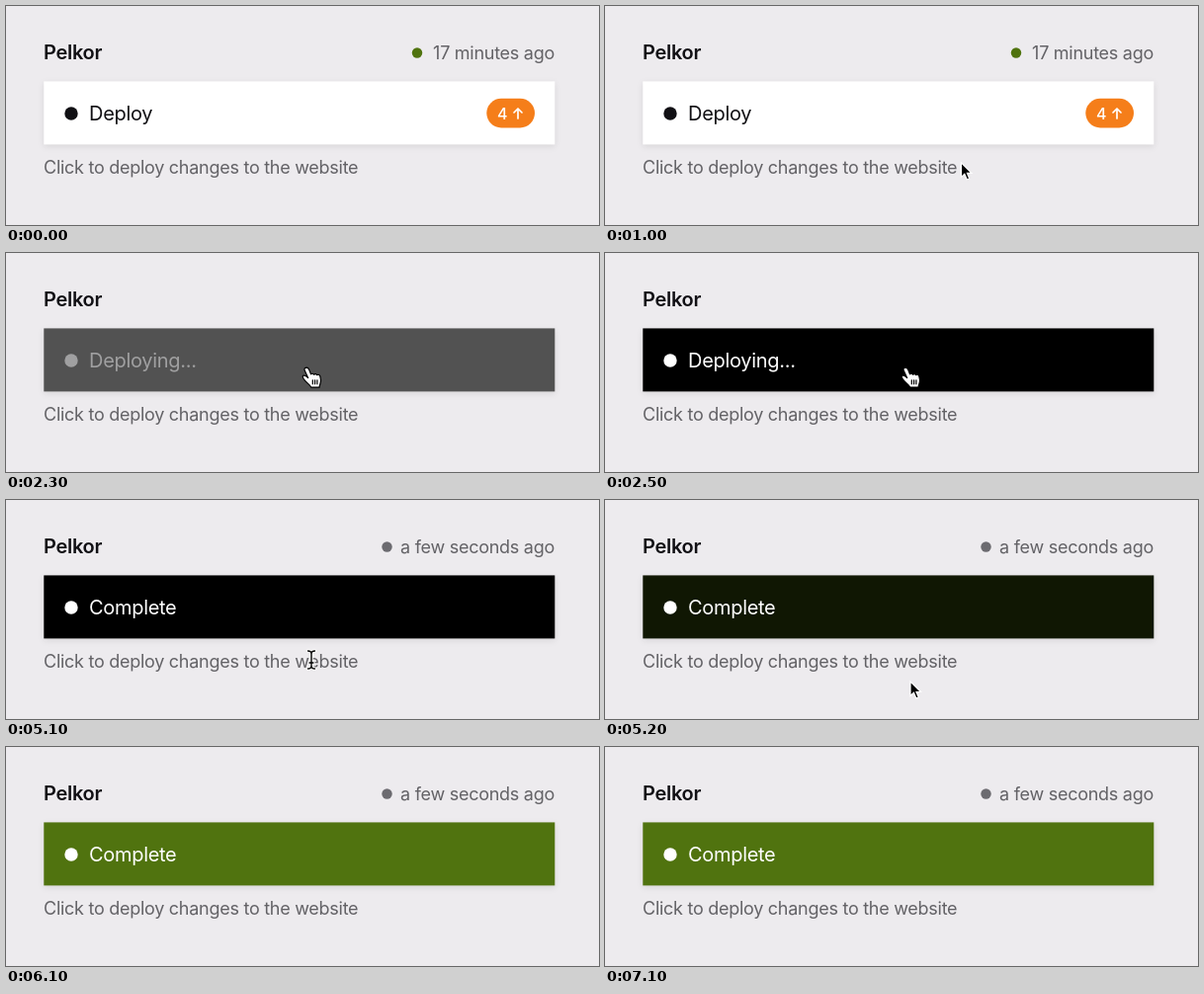
An HTML page that plays this animation: 600x222 px, repeating every 7.2 s.

```html
<!DOCTYPE html>
<html lang="en">
<head>
<meta charset="utf-8">
<title>Deploy button</title>
<style>
  html, body { margin: 0; width: 100%; height: 100%; overflow: hidden; background: #edebee; }
  svg { display: block; width: 600px; height: 222px; }
  text { font: 18px Inter, "Open Sans", sans-serif; letter-spacing: -.015em; fill: #636266; }
  .title { font-size: 20px; font-weight: 600; fill: #111014; }
  .label { font-size: 20px; fill: inherit; }
  .end { text-anchor: end; }
  #button { filter: drop-shadow(0 2px 3px rgba(0, 0, 0, .09)); }
  #badge text { font-size: 16px; font-weight: 500; fill: #fff; }
  .line { fill: none; stroke-linecap: round; stroke-linejoin: round; }
</style>
</head>
<body>
<svg viewBox="0 0 600 222">
  <defs>
    <path id="stem" d="M-3.5 -9Q0 -9 0 -6V6Q0 9 -3.5 9M3.5 -9Q0 -9 0 -6M0 6Q0 9 3.5 9M-2 3H2"/>
  </defs>

  <text class="title" x="38" y="54">Pelkor</text>
  <g id="status">
    <circle id="dot" cy="47.5" r="5.2"/>
    <text id="ago" class="end" x="555" y="53.5"></text>
  </g>
  <rect id="button" x="38.3" y="76.4" width="517" height="64"/>
  <g id="content">
    <circle cx="66" cy="109" r="6.7"/>
    <text id="label" class="label" x="84" y="116"></text>
  </g>
  <g id="badge">
    <rect x="486.3" y="93.8" width="48.7" height="29.6" rx="14.8" fill="#f57e1a"/>
    <text x="497" y="114.5">4</text>
    <path class="line" d="M518 114V104M514 108L518 104L522 108" stroke="#fff" stroke-width="1.7"/>
  </g>
  <text x="38" y="170">Click to deploy changes to the website</text>

  <g id="hand" stroke="#000" stroke-width="1.2" stroke-linejoin="round">
    <path fill="#fff" d="M3.6 .9C5 .2 6.4 1 7 2.4L9 7.4C10 6.4 11.4 6.6 12 7.8C13 6.8 14.6 7 15.1 8.2C16.5 7.4 18 8 18.4 9.8L19 13C19.3 16 17.8 17.4 17.6 20.6H9.2C8.2 18 4.6 16 2.6 13.4C1 11.4 .2 9.6 1.2 8.8C2.8 7.9 4.8 9.8 6.2 11.2L2.7 3.6C2.1 2.3 2.6 1.3 3.6 .9Z"/>
    <path class="line" d="M10.8 13.3V17.3M13.1 13.3V17.3M15.4 13.3V17.3"/>
  </g>
  <path id="arrow" d="M0 0V14.5L3.4 11.3L5.8 17L8.3 16L6 10.5H10.5Z" stroke="#fff" stroke-width="1.2"/>
  <g id="beam" class="line">
    <use href="#stem" stroke="#fff" stroke-width="3.4"/>
    <use href="#stem" stroke="#000" stroke-width="1.4"/>
  </g>
</svg>
<script>
const LOOP = 7200, STEP = 100, FADE = 400;
const PRESS = 2052, DONE = 5085;
const WHITE = [255, 255, 255], BLACK = [0, 0, 0], GREEN = [80, 115, 15], INK = [17, 16, 20];
const $ = id => document.getElementById(id);
const ramp = (t, start, length) => Math.min(1, Math.max(0, (t - start) / length));
const smooth = u => u * u * (3 - 2 * u);
const lerp = (a, b, u) => a + (b - a) * u;
const mix = (a, b, u) => `rgb(${a.map((v, i) => Math.round(lerp(v, b[i], u)))})`;
const show = (id, on) => $(id).style.display = on ? "" : "none";

// Pointer position and shape; null while it is outside the stage.
function pointer(t) {
  if (t < 600 || t >= 5400) return null;
  if (t < 5100) {
    const u = smooth(ramp(t, 600, 900));
    const x = lerp(404, 299.5, u), y = lerp(190, 115.5, u);
    return { x, y, shape: y < 140 ? "hand" : "arrow" };
  }
  const u = (t - 5100) / 100;
  return { x: 309, y: 162 + 18 * u + 4 * u * u, shape: u < 1 ? "beam" : "arrow" };
}

function draw(t) {
  const press = smooth(ramp(t, PRESS, FADE)), done = smooth(ramp(t, DONE, FADE));
  const idle = t < 2200, complete = t >= 5100;

  $("button").style.fill = complete ? mix(BLACK, GREEN, done) : mix(WHITE, BLACK, press);
  $("content").style.fill = mix(INK, WHITE, press ** 1.3);
  $("label").textContent = idle ? "Deploy" : complete ? "Complete" : "Deploying...";
  show("badge", idle);
  show("status", idle || complete);
  $("ago").textContent = idle ? "17 minutes ago" : "a few seconds ago";
  $("dot").setAttribute("cx", idle ? 416 : 385.5);
  $("dot").style.fill = idle ? "#50730f" : "#6c6b70";

  const p = pointer(t);
  for (const id of ["hand", "arrow", "beam"]) {
    show(id, p && p.shape === id);
    if (p) $(id).setAttribute("transform", `translate(${p.x} ${p.y})`);
  }
}

const begin = performance.now();
function tick() {
  const t = (performance.now() - begin) % LOOP;
  draw(Math.floor(t / STEP) * STEP);
  requestAnimationFrame(tick);
}
tick();
</script>
</body>
</html>
```
